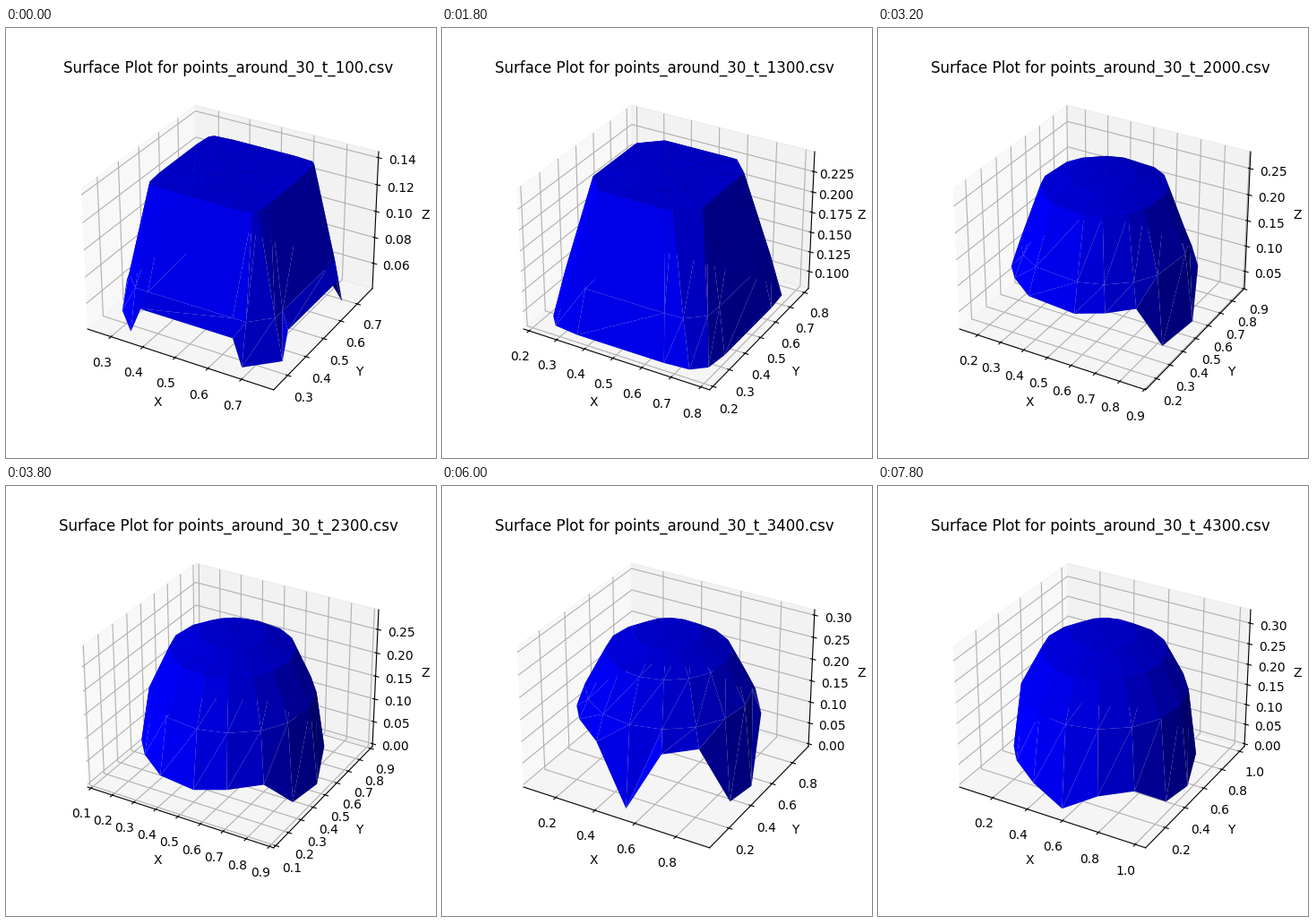
These frames come from a looping animation (480 px wide and 480 px high, 8 s). A matplotlib script:

```python
import numpy as np
import matplotlib.pyplot as plt
from matplotlib.animation import FuncAnimation
from matplotlib.ticker import MaxNLocator

SIZE, FRAMES, STEP_MS = 480, 40, 200
RADII = np.array([1, .9, .67, .36])     # rings from rim to crown
COLS = 16                               # four columns around each corner
HALF, FLOOR, TOP = .436, .02, .98       # extent of the body inside the axes box

# step, x and y limits, z limits, height of the rim
KEYS = np.array([
    (0, .225, .794, .0402, .1444, .21),
    (9, .180, .829, .0780, .2490, .02),
    (13, .156, .891, .0372, .2715, .46),
    (19, .084, .918, -.0060, .2915, .17),
    (24, .066, .931, .0360, .2903, .05),
    (30, .032, .962, -.0064, .3122, .42),
    (39, .005, 1.056, -.0068, .3322, .12),
])

rim_jitter = np.random.default_rng(4).uniform(-.05, .05, COLS)


def at(step, points):
    """Piecewise linear value from (step, value) pairs."""
    return np.interp(step, *zip(*points))


def roundness(step):
    """0 for the square frustum, 1 for the dome."""
    u = np.clip((step - 6) / 16, 0, 1)
    return u * u * (3 - 2 * u)


def ring_angles(spread, inner, turn):
    corners = 45 + 90 * np.arange(4)[:, None]
    return np.radians(corners + [-inner, -spread, spread, inner] + turn).ravel()


def rim_heights(step, level, e):
    """Rim at one level, with legs reaching down to the floor."""
    legs = np.zeros(COLS)
    legs[1::4] = legs[2::4] = np.clip(1 - step / 9, 0, 1)
    legs[[0, -1]] = np.clip(step / 9, 0, 1)
    legs[12] = np.clip((step - 19) / 11, 0, 1)
    rim = level + (FLOOR - level) * legs + e * rim_jitter * (1 - legs)
    return np.maximum(rim, FLOOR)


def body(step, level):
    """Points of the surface, x and y about 0, height from 0 to 1."""
    e = roundness(step)
    power = 2 + 10 * (1 - e) ** 4
    low = at(step, [(0, 10.5), (9, 4.5), (19, 11.25)])
    high = at(step, [(0, 2), (9, 11.25)])
    inner = 15 + 18.75 * e

    shape = (1 - e) * np.clip((1 - RADII) / .33, 0, 1) + e * (1 - RADII ** 3) ** .4
    heights = np.maximum(FLOOR + (TOP - FLOOR) * shape, level + .08)
    points = []
    for i, (r, h) in enumerate(zip(RADII, heights)):
        spread = low + (high - low) * min((1 - r) / .33, 1)
        th = ring_angles(spread, inner, -8 * e)
        c, s = np.cos(th), np.sin(th)
        rad = HALF * r / (abs(c) ** power + abs(s) ** power) ** (1 / power)
        z = np.full(COLS, h) if i else rim_heights(step, level, e)
        points.append(np.column_stack([rad * c, rad * s, z]))
    return np.vstack(points + [[[0, 0, TOP]]])


def mesh():
    """Triangles between neighbouring rings, and a fan to the apex."""
    tris = []
    apex = len(RADII) * COLS
    for i in range(len(RADII)):
        for j in range(COLS):
            a, b = i * COLS + j, i * COLS + (j + 1) % COLS
            if i == len(RADII) - 1:
                tris.append((a, b, apex))
            else:
                tris += [(a, b, b + COLS), (a, b + COLS, a + COLS)]
    return tris


TRIANGLES = mesh()

fig = plt.figure(figsize=(SIZE / 100, SIZE / 100), dpi=100)
ax = fig.add_axes([0, .11, 496 / SIZE, .77], projection="3d")
title = ax.set_title("")


def draw(step):
    lo, hi, z0, z1, level = (np.interp(step, KEYS[:, 0], col) for col in KEYS.T[1:])
    for old in list(ax.collections):
        old.remove()

    x, y, z = body(step, level).T
    ax.plot_trisurf(lo + (x + .5) * (hi - lo), lo + (y + .5) * (hi - lo),
                    z0 + z * (z1 - z0), triangles=TRIANGLES, color="blue")
    ax.set(xlim=(lo, hi), ylim=(lo, hi), zlim=(z0, z1),
           xlabel="X", ylabel="Y", zlabel="Z")
    for axis in (ax.xaxis, ax.yaxis, ax.zaxis):
        axis.set_major_locator(MaxNLocator(8, steps=[1, 2, 2.5, 5, 10]))

    t = 400 + 100 * step if step else 100
    title.set_text(f"Surface Plot for points_around_30_t_{t}.csv")
    return title,


anim = FuncAnimation(fig, draw, frames=FRAMES, init_func=lambda: draw(0),
                     interval=STEP_MS, repeat=True, repeat_delay=0)
plt.show()
```
